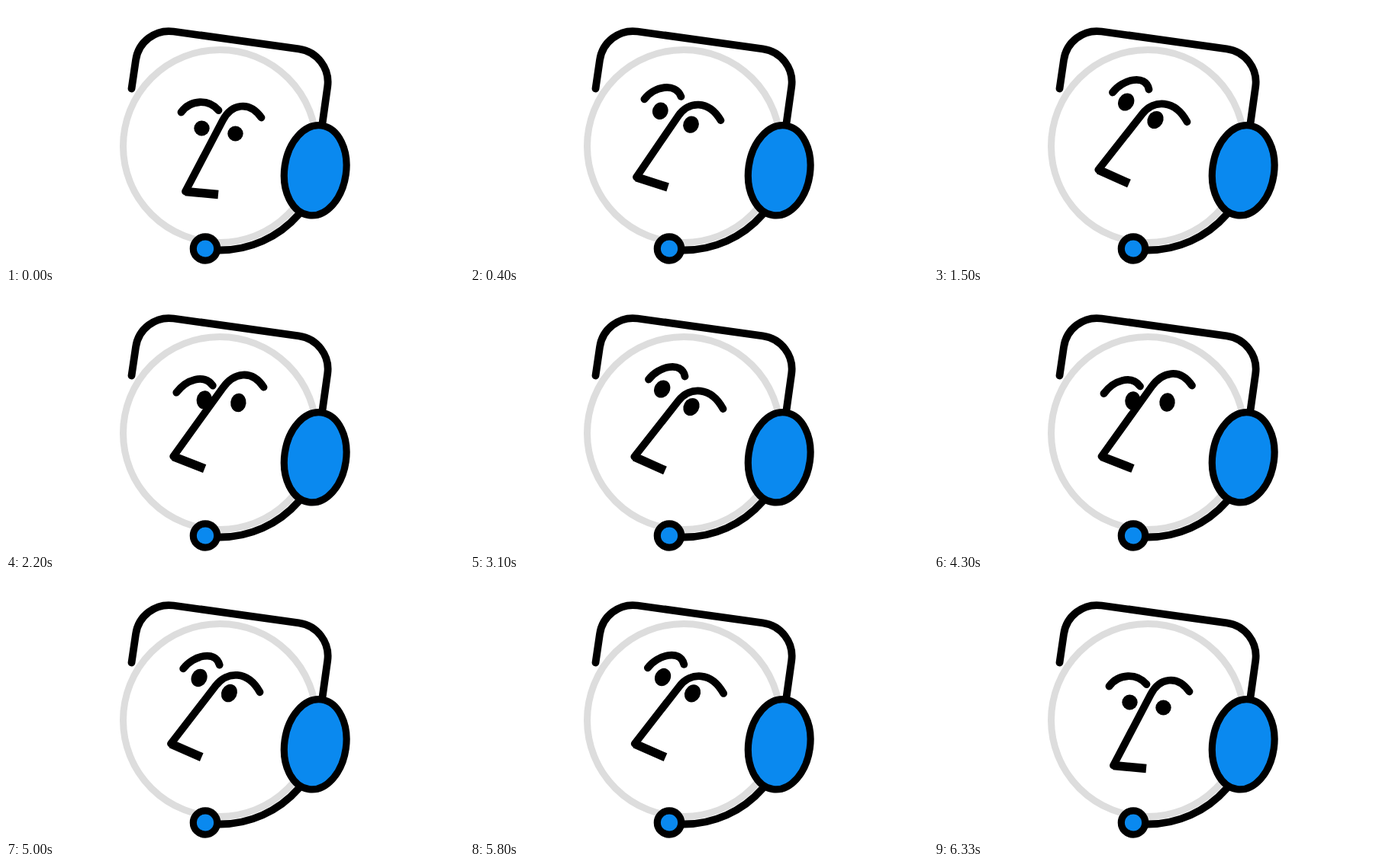
Write an HTML page that moves like this. It is 600 by 340 pixels and loops after 6.47 s.

```html
<!DOCTYPE html>
<html lang="en">
<head>
<meta charset="utf-8">
<title>Headset face</title>
<style>
  html, body { margin: 0; width: 100%; height: 100%; overflow: hidden; background: #fff; }
  svg { display: block; width: 100vw; height: 100vh; }
  .line { fill: none; stroke: #000; stroke-width: 9.8; stroke-linecap: round; stroke-linejoin: round; }
  .pad { fill: #0a89ef; stroke: #000; stroke-width: 9.2; }
  #base { stroke-width: 11.5; stroke-linecap: butt; }
</style>
</head>
<body>
<svg viewBox="0 0 600 340">
  <circle cx="280" cy="184" r="126.5" fill="none" stroke="#ddd" stroke-width="9"/>
  <path class="line" d="M164.5 108.5L170 71A44 44 0 0 1 219.6 33.5L383.6 56.4A44 44 0 0 1 421.2 106L414.5 154"/>
  <path class="line" d="M383 274A136.5 136.5 0 0 1 279 320.5"/>
  <ellipse class="pad" cx="405.2" cy="215.8" rx="40.4" ry="59.4" transform="rotate(8 405.2 215.8)"/>
  <circle class="pad" cx="261" cy="318.5" r="15.7"/>
  <ellipse id="eyeL"/>
  <ellipse id="eyeR"/>
  <path id="brow" class="line"/>
  <path id="nose" class="line"/>
  <path id="base" class="line"/>
</svg>
<script>
const LOOP = 6470, STEP = 100, LAST = 6330;

// key points of the face; eye is [height, tilt]
const front = {
  browL: [229.5, 139.5], browR: [278.5, 137], eyeL: [256.5, 160.5], eyeR: [300.5, 167.5],
  tip: [278, 247.5], corner: [235, 243.5], bridge: [284, 150], end: [334.5, 146.5], eye: [10, 0]
};
const up = {
  browL: [234, 113.5], browR: [281.5, 109.5], eyeL: [251.7, 126], eyeR: [290, 149.5],
  tip: [255.5, 233], corner: [215.3, 215], bridge: [273, 141.5], end: [331.5, 152], eye: [12, 30]
};
const side = {
  browL: [222.5, 132], browR: [270, 122.5], eyeL: [260.5, 141.5], eyeR: [305.5, 143.5],
  tip: [260.5, 230.5], corner: [219.5, 214.5], bridge: [285, 123], end: [338, 121.5], eye: [12.3, 5]
};

// [time, lift from front to up, look from up to side]
const REST = 0.05;
const glance = t => [[t, 1, REST], [t + 600, 1, 1], [t + 1000, 1, 1], [t + 1400, 1, 0], [t + 1800, 1, REST]];
const keys = [
  [0, 0, 0], [90, 0, 0], [600, 1, 0], [1000, 1, REST], [1200, 1, REST], [1500, 1, 0],
  ...glance(1700), ...glance(3700),
  [5700, 1, REST], [5800, 1, 2 * REST], [LAST, 0, 0]
];

const smooth = u => u * u * (3 - 2 * u);
const lerp = (a, b, k) => a + (b - a) * k;
const add = (p, dx, dy) => [p[0] + dx, p[1] + dy];

function mix(a, b, k) {
  const out = {};
  for (const name in a) out[name] = a[name].map((v, i) => lerp(v, b[name][i], k));
  return out;
}

function stateAt(t) {
  const n = Math.max(1, keys.findIndex(key => key[0] >= t));
  const a = keys[n - 1], b = keys[n];
  const u = smooth((t - a[0]) / (b[0] - a[0]));
  return [lerp(a[1], b[1], u), lerp(a[2], b[2], u)];
}

const el = id => document.getElementById(id);
const at = p => p.map(v => v.toFixed(2)).join(" ");
const draw = (id, d) => el(id).setAttribute("d", d);

function drawBrow(p) {
  const tilt = p.eye[1];
  const c1 = add(p.browL, 12.5, -17);
  const c2 = add(p.browR, 0.3 * tilt - 13, -15 - 0.2 * tilt);
  draw("brow", `M${at(p.browL)}C${at(c1)} ${at(c2)} ${at(p.browR)}`);
}

function drawNose(p) {
  const dx = p.bridge[0] - p.corner[0], dy = p.bridge[1] - p.corner[1];
  const k = 24 / Math.hypot(dx, dy);
  const c1 = add(p.bridge, dx * k, dy * k);
  const c2 = add(p.end, -16, -24.5 - 0.5 * (p.end[1] - p.bridge[1]));
  draw("nose", `M${at(p.tip)}L${at(p.corner)}`.replace(/^M.*L/, "M") +
    `L${at(p.bridge)}C${at(c1)} ${at(c2)} ${at(p.end)}`);
  draw("base", `M${at(p.tip)}L${at(p.corner)}`);
}

function drawEye(id, [x, y], [height, tilt]) {
  const attrs = { cx: x, cy: y, rx: 10.2, ry: height, transform: `rotate(${tilt} ${x} ${y})` };
  for (const name in attrs) el(id).setAttribute(name, attrs[name]);
}

function render(ms) {
  const now = ms % LOOP;
  const t = now >= LAST ? LAST : Math.min(6200, Math.floor(now / STEP) * STEP);
  const [lift, look] = stateAt(t);
  const p = mix(front, mix(up, side, look), lift);
  // the face swings left on its way up
  const sway = t < 1000 ? -18 * lift * (1 - lift) : 0;
  for (const name in p) if (name !== "eye") p[name][0] += sway;
  drawBrow(p);
  drawNose(p);
  drawEye("eyeL", p.eyeL, p.eye);
  drawEye("eyeR", p.eyeR, p.eye);
}

const start = performance.now();
function tick() {
  render(performance.now() - start);
  requestAnimationFrame(tick);
}
tick();
</script>
</body>
</html>
```
